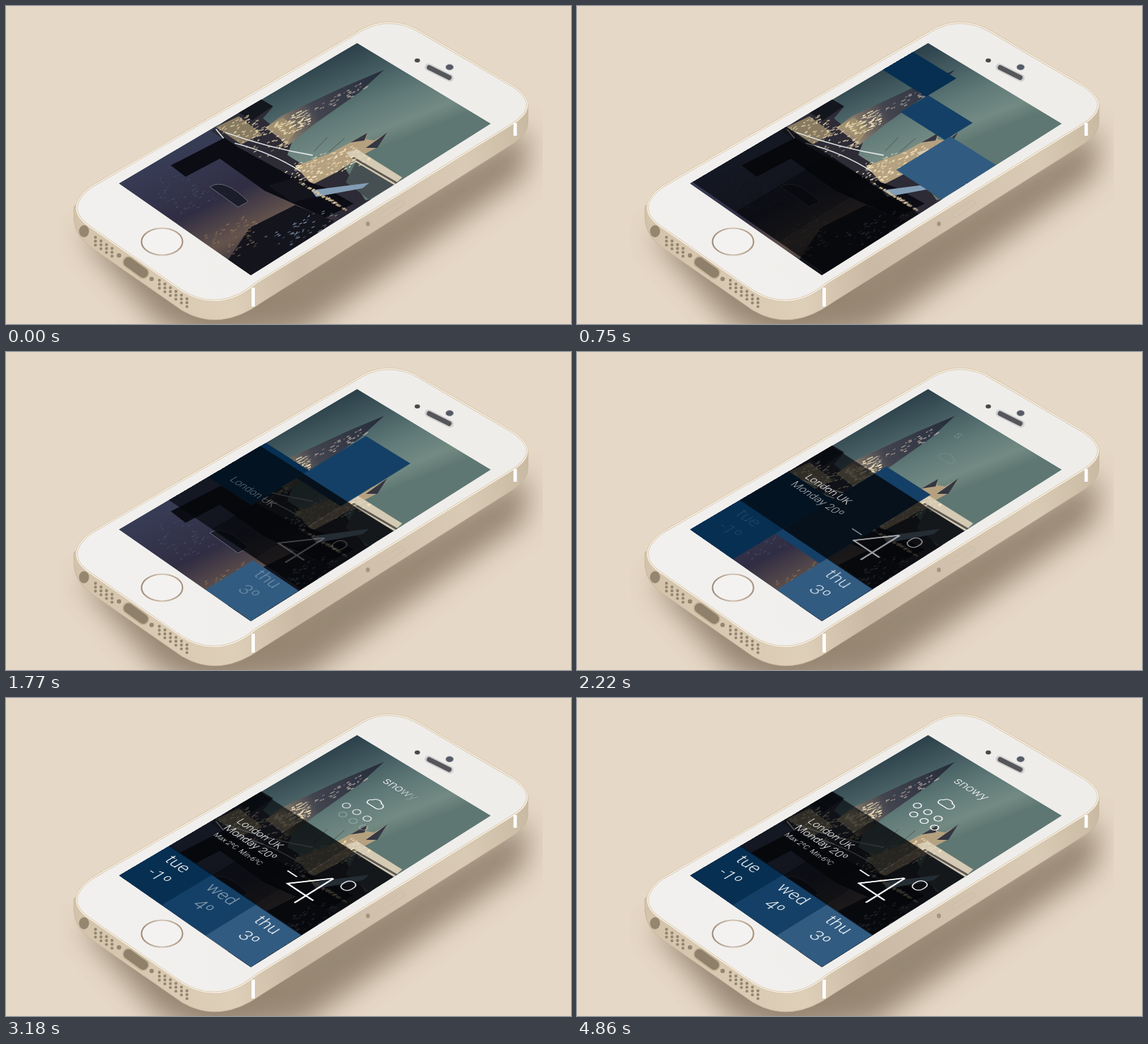
An HTML page that plays this animation: 840 by 473 pixels, repeating every 5.4 s.

```html
<!DOCTYPE html>
<html lang="en">
<head>
<meta charset="utf-8">
<title>Weather tiles</title>
<style>
html, body { margin: 0; width: 100%; height: 100%; overflow: hidden; background: #e6d8c6; }
svg { position: absolute; left: 0; top: 0; display: block; overflow: hidden; }
#ui {
  transform-origin: 0 0;
  transform: matrix3d(.5359,.3549,0,-.0001151, -.64,.3416,0,-.0000998, 0,0,1,0, 522,55,0,1);
  font-family: Roboto, Inter, sans-serif;
  font-weight: 300;
  fill: #fff;
}
</style>
</head>
<body>
<svg width="840" height="473" viewBox="0 0 840 473">
  <defs>
    <linearGradient id="side" x1="100" y1="330" x2="776" y2="180" gradientUnits="userSpaceOnUse">
      <stop offset="0" stop-color="#d3c3ab"/><stop offset=".3" stop-color="#decfb9"/>
      <stop offset=".45" stop-color="#cabaa5"/><stop offset=".85" stop-color="#d9cab5"/><stop offset="1" stop-color="#c9baa3"/>
    </linearGradient>
    <linearGradient id="face" x1="200" y1="360" x2="700" y2="90" gradientUnits="userSpaceOnUse">
      <stop offset="0" stop-color="#f1f0ee"/><stop offset="1" stop-color="#eeedea"/>
    </linearGradient>
    <linearGradient id="sky" x1="500" y1="60" x2="560" y2="210" gradientUnits="userSpaceOnUse">
      <stop offset="0" stop-color="#293d47"/><stop offset=".3" stop-color="#435b60"/><stop offset=".6" stop-color="#607a78"/>
      <stop offset=".85" stop-color="#738a83"/><stop offset="1" stop-color="#5f7772"/>
    </linearGradient>
    <linearGradient id="water" x1="250" y1="220" x2="340" y2="400" gradientUnits="userSpaceOnUse">
      <stop offset="0" stop-color="#373c55"/><stop offset=".45" stop-color="#302d43"/>
      <stop offset=".75" stop-color="#65544d"/><stop offset="1" stop-color="#2c2837"/>
    </linearGradient>
    <linearGradient id="spire" x1="555" y1="97" x2="395" y2="190" gradientUnits="userSpaceOnUse">
      <stop offset="0" stop-color="#252d3c"/><stop offset=".6" stop-color="#42444e"/><stop offset="1" stop-color="#a39277"/>
    </linearGradient>
    <linearGradient id="ring" x1="0" x2="1">
      <stop offset="0" stop-color="#a08b79"/><stop offset=".5" stop-color="#d3c4b5"/><stop offset="1" stop-color="#a8907a"/>
    </linearGradient>
    <filter id="blur" x="-30%" y="-30%" width="160%" height="160%"><feGaussianBlur stdDeviation="20"/></filter>
    <clipPath id="floor"><path d="M80 0H798V473H80Z"/></clipPath>
    <clipPath id="glass"><path d="M522 55L721 175 364 400.500 168 264Z"/></clipPath>
  </defs>

  <g clip-path="url(#floor)">
    <path d="M106 335L225 470 300 505 440 485 772 250 774 180 400 390Z" fill="#7c6b57" opacity=".75" filter="url(#blur)"/>
  </g>
  <path d="M101 298V318Q104 345 128 360L262 453Q318 486 380 441L755 204Q776 190 776 172V148L560 60Z" fill="url(#side)" stroke="#c2b29b" stroke-width=".8"/>
  <path d="M128 268L519 42Q566 10 615 38L752 118Q798 148 752 176L372 412Q318 458 262 424L124 328Q84 300 128 268Z" fill="url(#face)" stroke="#d8c6ab" stroke-width="3.2"/>
  <path d="M128 268L519 42Q566 10 615 38L752 118Q798 148 752 176L372 412Q318 458 262 424L124 328Q84 300 128 268Z" fill="none" stroke="#fcf8f0" stroke-width="1.3"/>
  <path d="M367.500 419V447M757 174V193" stroke="#fff" stroke-width="5"/>
  <path d="M562 310L588 293" stroke="#c8b9a2" stroke-width="9" stroke-linecap="round"/>
  <path d="M562 310L588 293" stroke="#d2c3ae" stroke-width="7.500" stroke-linecap="round"/>
  <ellipse cx="538" cy="324" rx="3" ry="3.500" fill="#a4957d"/>
  <ellipse cx="232" cy="350.500" rx="30.500" ry="20" fill="#f3f2f1" stroke="url(#ring)" stroke-width="2.200"/>
  <g fill="#94866f" id="holes">
    <ellipse cx="116" cy="335" rx="7.500" ry="9"/>
    <circle cx="168" cy="371" r="3.300"/><circle cx="216.500" cy="406" r="3.300"/>
  </g>
  <path d="M182 381L204 397" stroke="#c1b196" stroke-width="18" stroke-linecap="round"/>
  <path d="M182 381L204 397" stroke="#8e806a" stroke-width="14.500" stroke-linecap="round"/>
  <path d="M628 91L660 107" stroke="#d1d0d0" stroke-width="11" stroke-linecap="round"/>
  <path d="M629 91.500L659 106.500" stroke="#55565a" stroke-width="7" stroke-linecap="round"/>
  <ellipse cx="611.500" cy="81" rx="4" ry="3" fill="#4c4847"/>
  <ellipse cx="659.500" cy="91" rx="6" ry="4.500" fill="#555b66" stroke="#d0d0d0"/>

  <g clip-path="url(#glass)">
    <path d="M522 55L721 175 364 401 168 264Z" fill="url(#sky)"/>
    <path d="M300 180L345 172 440 236 525 290 560 285 364 405 160 264Z" fill="url(#water)"/>
    <path d="M305 186L345 157 378 138 397 150 382 167 425 203 418 222 442 236 500 235 535 290 500 318Z" fill="#2d2b36"/>
    <path d="M345 158L378 138 397 149 366 170Z" fill="#14161e"/>
    <path d="M520 232L577 266 540 288 505 262Z" fill="#465052"/>
    <path d="M562 95L505 119 410 163 386 181 420 207 458 176 526 128Z" fill="url(#spire)"/>
    <path d="M312 180L346 164 380 190 350 206ZM390 178L412 166 434 183 420 200Z" fill="#a6946f" opacity=".75"/>
    <path d="M430 238L482 219 512 203 522 197 537 190 535 198 547 200 567 189 552 210 530 222 492 247 455 266Z" fill="#b5a180"/>
    <path d="M512 203L537 189 533 200ZM535 211L567 188 552 211Z" fill="#343642"/>
    <path d="M458 216L478 195M480 217L503 197" stroke="#4d5355"/>
    <path d="M505 218L522 213 589 255 577 266 520 232Z" fill="#d5cab3"/>
    <path d="M515 225L582 264" stroke="#5c5753" stroke-width="3"/>
    <path d="M312 183Q360 245 416 249M326 188Q390 211 456 222M340 204Q395 218 438 246" fill="none" stroke="#dce0e1" stroke-width="1.800"/>
    <path d="M245 237L325 196 345 210 420 251 474 270 517 294 475 315 430 295 385 275 318 227 267 254Z" fill="#0c0c14"/>
    <path d="M390 267L437 253 462 283 426 292ZM362 330L430 296 488 320 444 354 364 400 330 378Z" fill="#14141d"/>
    <path d="M454 274L540 263 530 271 461 284Z" fill="#839db5"/>
    <path d="M303 269Q325 255 360 291L345 299Z" fill="#1b1d2a" stroke="#6a6c78"/>
    <g id="lights"></g>
  </g>
</svg>

<svg id="ui" width="320" height="568" viewBox="0 0 320 568"></svg>

<script>
const LOOP = 5400, W = 320, H = 568, COL = W / 3;
const ui = document.getElementById("ui");

function add(parent, tag, attrs, text = "") {
  const node = document.createElementNS("http://www.w3.org/2000/svg", tag);
  for (const key in attrs) node.setAttribute(key, attrs[key]);
  node.textContent = text;
  return parent.appendChild(node);
}

// Speaker holes
const holes = document.getElementById("holes");
for (const [x, y, cols] of [[133, 344, 4], [228, 408, 6]])
  for (let i = 0; i < cols * 3; i++)
    add(holes, "circle", { cx: x + i % cols * 8.2, cy: y + i % cols * 5.5 + Math.floor(i / cols) * 5.8, r: 2.2 });

// Lit windows and reflections over parallelograms: count, origin, two sides, colour
let seed = 7;
const random = () => (seed = seed * 16807 % 2147483647) / 2147483647;
const lights = document.getElementById("lights");
for (const [count, x, y, ax, ay, bx, by, color] of [
  [110, 312, 184, 45, -22, 70, 45, "#e6d3ab"],
  [100, 393, 178, 45, -22, 23, 16, "#f8e6bd"],
  [45, 435, 160, 95, -46, 12, 8, "#b6a8a0"],
  [130, 405, 243, 105, -36, 35, 24, "#f8e6bd"],
  [70, 430, 260, 50, 28, 30, 20, "#d6c19c"],
  [50, 385, 345, 85, -45, 30, 18, "#75879b"],
  [60, 290, 345, 60, -35, 50, 30, "#8c7558"],
  [45, 195, 265, 50, -25, 70, 48, "#454a68"]
]) for (let i = 0; i < count; i++) {
  const a = random(), b = random();
  add(lights, "path", {
    d: `M${x + a * ax + b * bx} ${y + a * ay + b * by}l${2 + random() * 3} -2`,
    stroke: color, "stroke-width": 1.4, opacity: .35 + random() * .65
  });
}

const clamp = x => Math.max(0, Math.min(1, x));
const ramp = (t, start, length) => clamp((t - start) / length);
const easeOut = x => 1 - (1 - x) ** 2;

// Smooth interpolation between [time, ...values] keys
function track(keys, t) {
  const next = keys.findIndex(key => key[0] > t);
  if (next < 0) return keys[keys.length - 1].slice(1);
  if (!next) return keys[0].slice(1);
  const from = keys[next - 1], to = keys[next];
  const x = (t - from[0]) / (to[0] - from[0]), eased = x * x * (3 - 2 * x);
  return from.slice(1).map((value, i) => value + (to[i + 1] - value) * eased);
}

// Keys hold the top and bottom edges as fractions of the screen height
const tiles = [
  { day: "tue", temp: "-1º", color: "#062f52", fade: [2150, 750],
    keys: [[30, 0, 0], [750, .067, .2], [1770, .397, .64], [2220, .6, 1], [2700, .797, 1]] },
  { day: "wed", temp: "4º", color: "#144067", fade: [2700, 900],
    keys: [[30, 0, 0], [750, .19, .31], [1770, .152, .45], [2220, .37, .83], [2800, .797, 1]] },
  { day: "thu", temp: "3º", color: "#315b81", fade: [1500, 850],
    keys: [[30, 0, 0], [750, .285, .515], [1770, .81, 1], [2220, .797, 1]] }
];
tiles.forEach((tile, i) => {
  tile.rect = add(ui, "rect", { x: i * COL, width: COL + .3, fill: tile.color });
});

const shade = add(ui, "g", {});
[.66, .8, .74].forEach((opacity, i) =>
  add(shade, "rect", { x: i * COL, width: COL, height: .38 * H, fill: "#030508", opacity }));

tiles.forEach((tile, i) => {
  tile.label = add(ui, "g", { "font-size": 34, "text-anchor": "middle" });
  add(tile.label, "text", { x: 46 + i * 109, y: 487 }, tile.day);
  add(tile.label, "text", { x: 48 + i * 109, y: 532 }, tile.temp);
});

// Lines that fade in while rising
const lines = [
  ["London UK", 31, 327, 21.5, 300, 1500, 700, 24, 1500],
  ["Monday 20º", 28, 355, 22.5, 300, 1850, 520, 18, 1300],
  ["Max 2ºC  Min-6ºC", 30, 380, 14.5, 300, 2300, 800, 12, 1000],
  ["-", 183, 384, 100, 200, 1770, 1000, 30, 2000],
  ["4", 203, 404, 128, 200, 1500, 1200, 30, 2000],
  ["º", 268, 347, 74, 200, 1500, 1200, 30, 2000]
].map(([text, x, y, size, weight, start, fade, rise, length]) => ({
  start, fade, rise, length,
  node: add(ui, "text", { x, y, "font-size": size, "font-weight": weight, style: "white-space:pre" }, text)
}));

const word = add(ui, "text", { x: 162, y: 66, "font-size": 26, "text-anchor": "middle" });
const letters = [..."snowy"].map(letter => add(word, "tspan", {}, letter));

const icon = { fill: "none", stroke: "#fff", "stroke-width": 1.9 };
const cloud = add(ui, "path", { ...icon, d: "M151 127a7 7 0 0 1-1-13a10 10 0 0 1 18-3a8 8 0 0 1 3 16z" });
const snow = [[130, 158], [143, 180]].map(([x, y]) => {
  const row = add(ui, "g", icon);
  for (let i = 0; i < 3; i++) add(row, "circle", { cx: x + i * 25, cy: y, r: 7 });
  return row;
});

const show = (node, opacity) => node.setAttribute("opacity", opacity);
const move = (node, x, y) => node.setAttribute("transform", `translate(${x} ${y})`);

function draw(now) {
  const t = now % LOOP;
  for (const { rect, label, keys, fade } of tiles) {
    const [top, bottom] = track(keys, t);
    rect.setAttribute("y", top * H);
    rect.setAttribute("height", (bottom - top) * H);
    show(label, .95 * ramp(t, ...fade));
  }
  move(shade, 0, track([[30, 1], [750, .61], [1770, .42]], t)[0] * H);
  for (const { node, start, fade, rise, length } of lines) {
    show(node, ramp(t, start, fade));
    move(node, 0, rise * (1 - easeOut(ramp(t, start, length))));
  }
  letters.forEach((node, i) => node.setAttribute("fill-opacity", ramp(t, 2100 + i * 230, 600)));
  show(cloud, ramp(t, 2150, 900));
  show(snow[0], ramp(t, 2550, 800));
  show(snow[1], ramp(t, 3000, 700));
  const sway = Math.sin(Math.PI * ramp(t, 3300, 1560));
  move(snow[1], 9 * sway, 4 * sway);
  requestAnimationFrame(draw);
}
requestAnimationFrame(draw);
</script>
</body>
</html>
```
